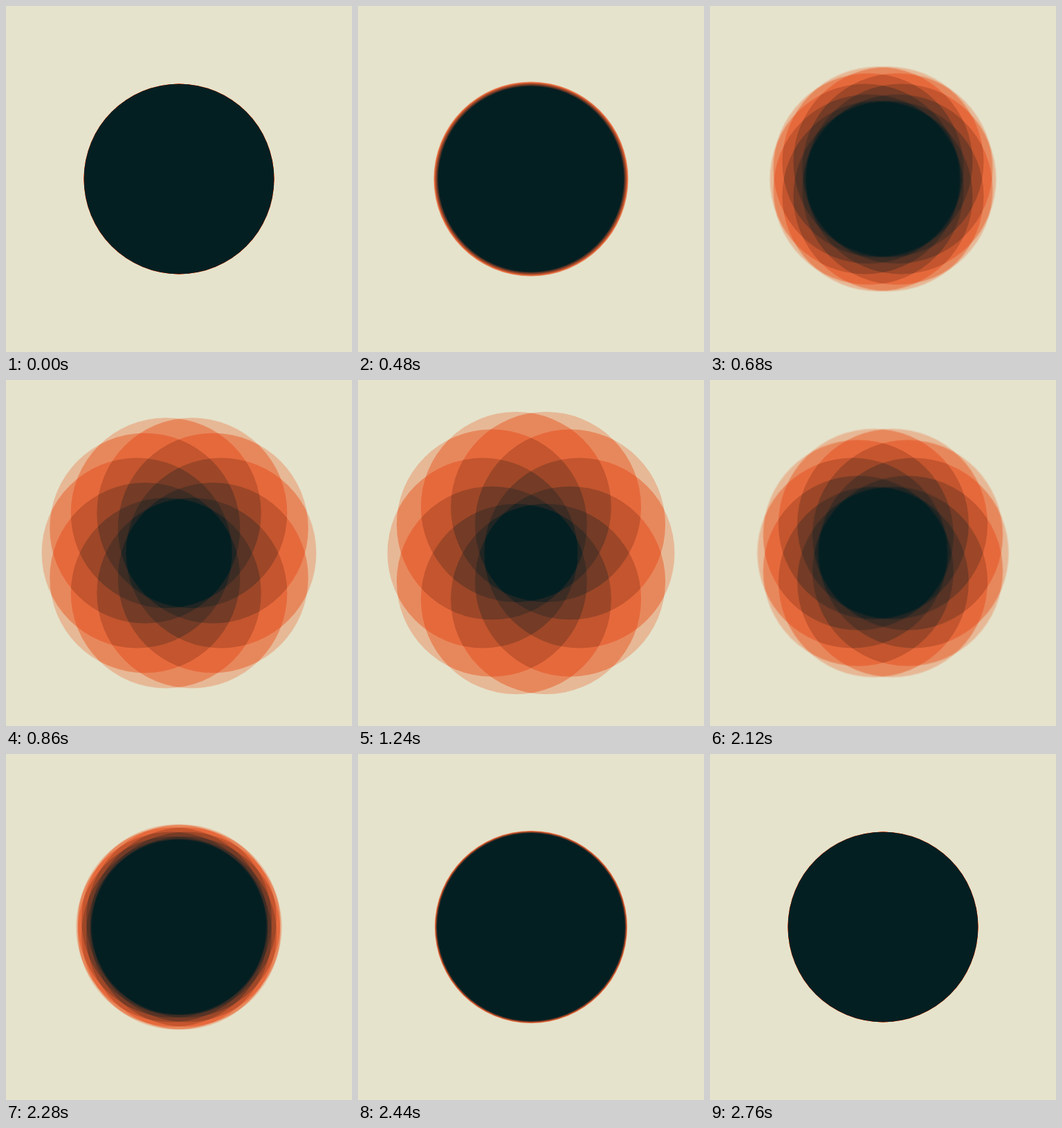
Write an HTML page with a canvas that moves like this. It is 500 px wide and 500 px high and loops after 2880 ms.

```html
<!DOCTYPE html>
<html lang="en">
<head>
<meta charset="utf-8">
<title>Ten circles</title>
<style>
  html, body { margin: 0; width: 100%; height: 100%; overflow: hidden; background: #e5e3cc; }
  canvas { display: block; width: 100vw; height: 100vh; }
</style>
</head>
<body>
<canvas id="stage" width="500" height="500"></canvas>
<script>
const SIZE = 500;
const LOOP = 2880;
const HALF = LOOP / 2;
const STEP = 20;
const CIRCLES = 10;
const RADIUS = 137.5;
const SPREAD = 70;
const SAMPLES = 5;
const SHUTTER = 0.6;
const LEVEL = 25;

// Colour for 0 to 10 overlapping circles.
const PALETTE = [
  [229, 227, 204], [231, 184, 150], [231, 136, 92], [230, 105, 60],
  [196, 85, 46], [157, 71, 40], [116, 59, 38], [86, 51, 37],
  [60, 44, 36], [32, 37, 35], [4, 31, 34]
];

const ctx = document.getElementById("stage").getContext("2d");
const layer = document.createElement("canvas");
layer.width = layer.height = SIZE;
const layerCtx = layer.getContext("2d", { willReadFrequently: true });
const output = ctx.createImageData(SIZE, SIZE);
const sums = new Float32Array(SIZE * SIZE * 3);

// Continuous ramp, so that soft edges pass through the colours in between.
const ramp = new Float32Array(256 * 3);
for (let v = 0; v < 256; v++) {
  const count = Math.min(v / LEVEL, CIRCLES);
  const low = Math.min(Math.floor(count), CIRCLES - 1);
  for (let c = 0; c < 3; c++) {
    const from = PALETTE[low][c];
    ramp[v * 3 + c] = from + (PALETTE[low + 1][c] - from) * (count - low);
  }
}

function ease(p) {
  return p < 0.5 ? 0.5 * (2 * p) ** 6 : 1 - 0.5 * (2 - 2 * p) ** 6;
}

function distanceAt(ms) {
  const t = ms % LOOP;
  const amount = t < HALF ? ease(t / HALF) : 1 - ease((t - HALF) / HALF);
  return SPREAD * amount;
}

function drawOverlaps(distance) {
  layerCtx.globalCompositeOperation = "source-over";
  layerCtx.fillStyle = "#000";
  layerCtx.fillRect(0, 0, SIZE, SIZE);
  layerCtx.globalCompositeOperation = "lighter";
  layerCtx.fillStyle = `rgb(${LEVEL}, ${LEVEL}, ${LEVEL})`;
  for (let i = 0; i < CIRCLES; i++) {
    const angle = i * 2 * Math.PI / CIRCLES;
    layerCtx.beginPath();
    layerCtx.arc(
      SIZE / 2 + distance * Math.cos(angle),
      SIZE / 2 + distance * Math.sin(angle),
      RADIUS, 0, 2 * Math.PI
    );
    layerCtx.fill();
  }
  return layerCtx.getImageData(0, 0, SIZE, SIZE).data;
}

// Average several moments within the shutter time for motion blur.
function render(ms) {
  sums.fill(0);
  for (let s = 0; s < SAMPLES; s++) {
    const pixels = drawOverlaps(distanceAt(ms + STEP * SHUTTER * s / SAMPLES));
    for (let i = 0, j = 0; i < pixels.length; i += 4, j += 3) {
      const k = pixels[i] * 3;
      sums[j] += ramp[k];
      sums[j + 1] += ramp[k + 1];
      sums[j + 2] += ramp[k + 2];
    }
  }
  const data = output.data;
  for (let i = 0, j = 0; i < data.length; i += 4, j += 3) {
    data[i] = sums[j] / SAMPLES;
    data[i + 1] = sums[j + 1] / SAMPLES;
    data[i + 2] = sums[j + 2] / SAMPLES;
    data[i + 3] = 255;
  }
  ctx.putImageData(output, 0, 0);
}

const start = performance.now();
let shown = -1;

function tick() {
  const elapsed = Math.max(0, performance.now() - start) % LOOP;
  const step = Math.floor(elapsed / STEP);
  if (step !== shown) {
    shown = step;
    render(step * STEP);
  }
  requestAnimationFrame(tick);
}

tick();
</script>
</body>
</html>
```
